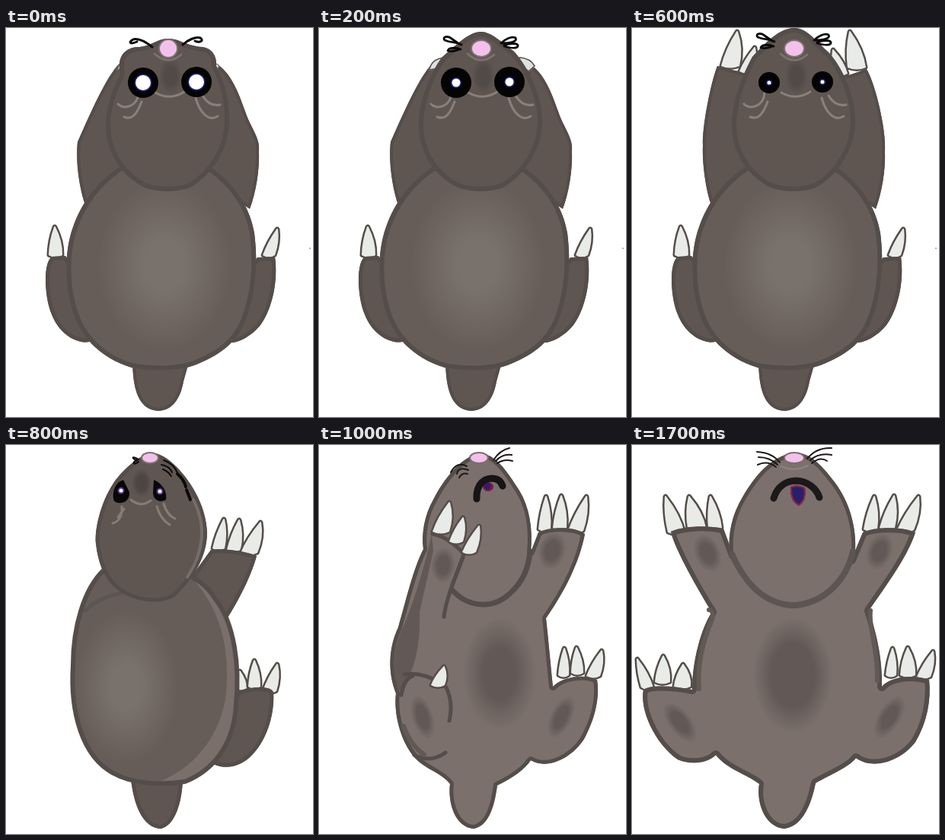
Write an HTML page with a canvas that moves like this. It is 403 px wide and 512 px high and loops after 2100 ms.

```html
<!DOCTYPE html>
<html lang="en">
<head>
<meta charset="utf-8">
<title>Rolling mole</title>
<style>
html, body { margin: 0; width: 100%; height: 100%; overflow: hidden; background: #fff; }
canvas { display: block; }
</style>
</head>
<body>
<canvas id="stage" width="403" height="512"></canvas>
<script>
const ctx = document.getElementById('stage').getContext('2d');
const EDGE = '#544d49', DARK = '#5f5652', BACK = '#675d58', BELLY = '#7b706b', PAD = '#625956', PINK = '#f3c0ec';

// Filled shape with its outline drawn inside the edge
function shape(d, fill, width = 5, edge = EDGE) {
  const path = new Path2D(d);
  ctx.save();
  ctx.fillStyle = fill;
  ctx.fill(path);
  ctx.clip(path);
  ctx.strokeStyle = edge;
  ctx.lineWidth = width * 2;
  if (width) ctx.stroke(path);
  ctx.restore();
}

function line(d, color = '#0b0909', width = 2) {
  ctx.strokeStyle = color;
  ctx.lineWidth = width;
  ctx.stroke(new Path2D(d));
}

function oval(x, y, rx, ry, fill, turn = 0) {
  ctx.fillStyle = fill;
  ctx.beginPath();
  ctx.ellipse(x, y, rx, ry, turn, 0, Math.PI * 2);
  ctx.fill();
}

// Soft-edged oval; core is the solid share of the radius
function glow(x, y, rx, ry, color, turn = 0, core = 0.5) {
  const g = ctx.createRadialGradient(0, 0, 0, 0, 0, 1);
  g.addColorStop(0, color);
  g.addColorStop(core, color);
  g.addColorStop(1, color + '00');
  ctx.save();
  ctx.translate(x, y);
  ctx.rotate(turn);
  ctx.scale(rx, ry);
  oval(0, 0, 1, 1, g);
  ctx.restore();
}

// Each claw: tip x, tip y, base x, base y, half width
function claws(...list) {
  for (const [tx, ty, x, y, w] of list) {
    const my = (ty + y) / 2, mx = (tx + x) / 2;
    const d = `M${x - w} ${y}Q${mx - w * .9} ${my} ${tx - 1} ${ty + 1}Q${tx} ${ty - 1} ${tx + 1} ${ty + 1}` +
      `Q${mx + w * 1.1} ${my} ${x + w} ${y}Q${x} ${y + 5} ${x - w} ${y}Z`;
    line(d, EDGE, 5);
    ctx.fillStyle = '#e8ebe8';
    ctx.fill(new Path2D(d));
  }
}

function eye(x, y, r, iris, ring = 1.5) {
  oval(x, y, r, r, '#050404');
  oval(x, y, iris + ring, iris + ring, '#20207a');
  oval(x, y, iris, iris, '#fff');
}

function nose(x, y, rx, ry) {
  oval(x, y, rx + 2, ry + 2, '#79706c');
  oval(x, y, rx, ry, PINK);
}

function sideFill(left, right) {
  const g = ctx.createLinearGradient(left, 0, right, 0);
  g.addColorStop(0, DARK);
  g.addColorStop(1, BELLY);
  return g;
}

const HEADS = [
  'M213 14C228 14 237 24 258 25C270 27 277 36 276 50C288 72 293 98 293 122C293 160 270 192 245 208C230 217 195 217 178 208C150 192 130 162 131 125C132 100 140 82 150 60C146 42 152 27 172 25C190 25 198 14 213 14Z',
  'M213 5C228 6 238 18 255 30C270 45 293 85 293 122C293 160 270 192 245 208C230 217 195 217 178 208C150 192 130 162 131 125C132 95 145 60 162 38C180 23 196 5 213 5Z',
  'M213 0C230 0 242 18 258 32C275 50 293 88 293 122C293 160 270 192 245 208C230 217 195 217 178 208C150 192 130 162 131 125C132 95 145 62 158 38C175 20 193 0 213 0Z'
];

function back(step) {
  shape('M166 440C167 470 171 502 200 504C222 503 230 482 233 465L240 440Z', DARK, 4);
  claws([64, 261, 65, 299, 9], [356, 264, 345, 299, 8]);
  shape('M60 301C49 310 51 345 56 365C62 388 75 406 95 412C105 415 112 413 116 410L120 350L78 300Z', DARK);
  shape('M330 302L353 301C357 330 351 367 334 391C322 406 305 414 296 414L290 350Z', DARK);

  if (step === 2) {
    claws([138, 4, 129, 50, 12], [286, 4, 295, 52, 12]);
    shape('M112 50C104 70 92 128 93 155C92 178 97 212 103 230L160 200L165 62L135 56Z', DARK, 4);
    shape('M308 54C320 75 334 135 332 162C333 187 328 217 320 238L260 200L262 64L285 62Z', DARK, 4);
    claws([161, 25, 150, 57, 9], [264, 28, 274, 60, 9]);
  } else {
    shape('M152 44C135 58 115 102 94 150C91 178 97 212 103 230L160 200L165 62Z', DARK, 4);
    shape('M275 46C292 57 302 75 314 110C322 133 334 145 332 162C333 187 328 217 320 238L260 200Z', DARK, 4);
    if (step) {
      shape('M144 56Q146 42 160 39L172 38L155 54Z', '#dfe1df', 1.5);
      shape('M263 38Q278 39 284 50L275 58L260 45Z', '#dfe1df', 1.5);
    } else {
      shape('M145 56L151 42L158 50Z', '#e8ebe8', 1);
      shape('M273 45L280 49L278 57Z', '#e8ebe8', 1);
    }
  }

  shape('M150 182C120 202 100 228 88 262C76 295 77 340 88 374C97 404 122 434 165 447C190 452 225 452 247 444C278 432 302 416 314 386C328 350 331 310 326 270C320 235 300 205 270 184Z', BACK, 6);
  glow(208, 312, 88, 112, '#79716b', 0, .3);
  shape(HEADS[step], DARK, 6);
  glow(216, 63, 15, 24, '#524a47');

  line('M196 85Q215 96 234 84M147 100C154 108 173 104 174 85M155 117C167 122 173 110 178 97M249 92C254 111 266 124 278 116M258 89Q267 104 281 101', '#89807c', 3);
  line('M195 34Q213 50 230 35', '#7b726e', 3);
  const [r, iris] = [[20, 10], [20, 5.5], [14, 2.5]][step];
  eye(180, 72, r, iris);
  eye(250, 71, r, iris);
  if (step) nose(213, 27, 12, 10);
  else nose(213, 27, 11, 11);

  if (step) {
    const y = step === 2 ? -4 : 0;
    ctx.save();
    ctx.translate(0, y);
    line('M187 22C180 18 174 20 165 16C161 11 170 10 174 14L184 21M186 28C178 25 170 26 169 30C178 32 181 29 185 28M239 20C244 15 253 10 258 13C261 18 251 20 240 20M243 23C250 20 262 19 261 24C259 28 250 26 243 24', '#0b0909', 2.8);
    ctx.restore();
  } else {
    line('M192 25C183 18 174 13 167 15C160 19 163 22 172 18M232 22C238 16 249 11 255 13C261 17 253 20 248 17', '#0b0909', 3);
  }
  oval(399, 290, 1, 1, '#999');
}

function turning() {
  shape('M164 440C168 475 180 504 203 505C222 501 231 470 232 440Z', DARK);
  claws([307, 297, 309, 320, 7], [326, 283, 326, 318, 8], [356, 288, 346, 324, 9]);
  shape('M305 324C325 317 350 317 351 326C353 356 341 392 320 411C305 425 285 427 270 419L285 360Z', DARK);
  claws([286, 97, 279, 136, 8], [306, 98, 299, 138, 9], [334, 101, 319, 142, 11]);
  shape('M269 138C285 135 320 141 329 146C322 172 305 205 291 227L235 185Z', DARK);

  const body = 'M128 165C102 190 88 240 86 290C82 352 98 412 140 434C165 448 205 450 235 445C272 430 301 397 304 342C309 290 302 235 276 202C266 187 256 180 240 172Z';
  shape(body, BACK, 0);
  ctx.save();
  ctx.clip(new Path2D(body));
  shape('M245 176C280 215 296 265 288 335C277 390 245 425 200 444L240 455L320 380L310 220Z', '#7a6f6a', 0);
  ctx.restore();
  glow(158, 318, 68, 100, '#79716b', 0, .3);
  line('M104 218Q123 200 151 195', '#5d5551', 5);
  line('M128 165C102 190 88 240 88 290C84 352 100 410 141 432C165 446 205 448 235 443C270 429 299 397 302 342C307 290 300 235 275 203C266 188 256 180 246 175', EDGE, 6);

  shape('M188 11C170 17 151 35 140 52C125 75 116 110 118 130C121 155 128 172 140 185C162 207 200 212 221 200C242 180 264 150 264 115C263 85 247 52 223 28C212 17 200 9 188 11Z', DARK, 5);
  line('M246 72C263 105 260 140 238 174', '#776d68', 4);
  glow(178, 50, 13, 19, '#4d4542');
  line('M164 72Q177 83 190 73M140 103C149 101 153 92 152 81M147 95L155 84M198 81Q203 98 215 105M207 77Q211 92 222 97', '#857c78', 3);
  shape('M154 46C143 49 138 64 142 74C151 80 163 74 162 62Z', '#080607', 0);
  shape('M194 46C203 49 212 60 210 72C201 77 193 72 193 62Z', '#080607', 0);
  for (const [x, y] of [[151, 60], [202, 61]]) {
    oval(x, y, 4.5, 4.5, '#55318c');
    oval(x, y, 2.5, 2.5, '#fff');
  }
  nose(189, 17, 10, 6);
  line('M174 19C165 13 164 18 172 20C164 23 168 27 174 22M204 26Q215 28 218 36M207 20Q221 25 225 37M206 32Q213 35 217 41', '#0b0909', 2);
  line('M225 38Q234 46 236 55M237 59L242 72', '#0b0909', 4);
}

function side() {
  claws([290, 66, 288, 111, 8], [308, 65, 305, 111, 9], [332, 67, 321, 112, 10],
    [309, 267, 308, 303, 6], [323, 265, 324, 301, 8], [351, 269, 343, 304, 8]);
  shape('M209 10C190 14 171 45 158 70C144 95 150 122 141 145C126 165 126 190 128 215C110 240 104 272 103 310C103 352 112 388 130 412C145 427 165 435 174 446C172 470 180 503 203 506C222 502 229 475 231 449C250 437 260 428 270 416C290 427 316 416 331 391C344 370 349 340 346 314C338 305 310 305 298 318C298 290 290 250 284 228C301 205 326 160 331 117C320 107 290 106 278 113L270 138C270 110 264 82 253 62C241 38 227 12 209 10Z', sideFill(176, 226), 5);
  line('M265 140C260 175 243 200 215 206', '#70655f', 4);
  line('M128 180Q123 200 131 220', '#5a514d', 7);

  claws([210, 65, 203, 106, 8], [231, 67, 220, 103, 8], [255, 68, 238, 108, 10]);
  shape('M194 110C207 99 237 106 245 116C236 148 211 180 190 205L174 150Z', '#796e69', 0);
  line('M193 109C185 137 163 169 144 188M245 116C235 148 207 184 185 213', EDGE, 5);
  line('M194 110Q218 101 245 115', EDGE, 3);
  glow(206, 135, 15, 22, PAD, .45);
  glow(296, 139, 17, 23, PAD, .3);

  claws([201, 267, 200, 299, 6], [214, 265, 215, 295, 7], [239, 269, 234, 299, 8]);
  shape('M195 303C174 312 161 345 162 400L183 412C215 405 238 350 237 305Q218 298 195 303Z', '#776c67', 0);
  line('M124 375C135 397 160 409 182 414C215 405 239 350 236 305', EDGE, 6);
  line('M192 304Q212 297 237 305', EDGE, 3);
  glow(196, 354, 14, 28, PAD, .4);
  glow(305, 358, 14, 30, PAD, .4);

  oval(187, 43, 10, 8, '#080607', -.7);
  oval(188, 43, 4, 4, '#3636a2');
  oval(188, 43, 2, 2, '#fff');
  shape('M227 32Q238 43 243 62L224 58Q222 43 227 32Z', '#161112', 0);
  line('M224 48Q231 40 238 48Q231 53 224 48', '#8d1c51', 2);
  oval(231, 48, 4, 2.5, '#36206d');
  nose(209, 15, 12, 5);
  line('M182 51Q163 51 156 62M177 55Q169 56 164 60', '#77706d', 1.8);
  line('M205 30Q201 42 210 50M210 29Q207 41 215 48M214 29Q211 38 218 44', '#0b0909', 2);
}

function opening() {
  claws([298, 67, 296, 111, 8], [318, 66, 316, 109, 9], [351, 67, 337, 113, 10],
    [322, 267, 321, 303, 7], [338, 266, 339, 300, 8], [371, 270, 360, 304, 9],
    [119, 267, 119, 302, 7], [149, 272, 139, 302, 8]);
  shape('M210 11C185 17 164 45 150 72C139 91 134 116 137 137C124 162 114 205 104 240C91 267 90 300 101 327C98 352 106 389 126 412C140 427 160 431 172 446C169 470 178 503 203 505C225 501 231 470 234 448C255 438 270 427 278 415C300 428 332 412 348 387C361 363 369 335 365 309C350 301 320 304 307 318C304 290 301 255 298 228C321 195 342 155 349 117C335 106 300 108 288 115L278 141C281 110 276 81 263 60C246 33 231 11 210 11Z', BELLY, 5);
  shape('M148 117C139 160 122 215 108 245C95 275 97 304 105 325L119 303Q134 268 132 220L150 140Z', PAD, 0);
  line('M174 190C197 216 230 215 250 196C268 180 275 162 277 140', EDGE, 7);
  line('M190 144C184 165 168 195 164 226', EDGE, 5);
  line('M190 143L174 185', EDGE, 4);
  line('M149 117Q170 121 190 143M112 302Q140 298 167 319C173 332 175 346 171 363M108 329Q112 307 123 304M125 408Q146 419 166 405', EDGE, 5);
  line('M111 370Q119 394 138 408', '#625955', 6);
  claws([171, 75, 160, 114, 11], [189, 95, 180, 127, 9], [210, 106, 197, 141, 9], [164, 291, 156, 316, 9]);

  glow(163, 158, 16, 24, PAD, .1);
  glow(306, 139, 18, 25, PAD, .25);
  glow(136, 358, 14, 30, PAD, -.3);
  glow(318, 358, 14, 30, PAD, .45);
  glow(237, 301, 48, 74, PAD, 0, .45);
  nose(210, 17, 11, 6);
  oval(222, 55, 7, 6, '#7b174d');
  oval(221, 54, 4.5, 4.5, '#351b69');
  line('M207 71C206 50 218 44 227 44C235 44 239 48 241 54', '#161415', 9);
  line('M229 20Q237 7 250 4M232 21Q241 11 253 13M234 24Q243 18 254 21M194 28Q181 21 173 36M196 33Q183 28 181 38M195 38Q188 36 184 43', '#1c1918', 2);
}

function front() {
  claws([44, 67, 58, 115, 11], [75, 67, 85, 109, 12], [103, 67, 109, 109, 9],
    [318, 67, 313, 111, 9], [344, 66, 335, 109, 10], [376, 67, 359, 112, 11],
    [7, 281, 20, 319, 8], [41, 277, 40, 312, 10], [67, 288, 66, 318, 11],
    [342, 267, 340, 303, 7], [362, 266, 362, 303, 10], [395, 271, 383, 305, 9]);
  shape('M51 114C55 135 89 195 105 220C91 240 79 285 79 322C55 317 25 315 15 322C10 348 29 392 60 414C80 422 100 418 110 408C125 427 150 433 167 446C163 470 174 503 200 505C225 502 236 470 241 445C262 433 285 424 294 412C316 428 352 417 372 391C387 366 393 335 390 309C370 302 340 304 328 318C329 280 320 245 311 218C326 195 361 150 372 115C350 106 315 109 303 115L288 151L133 145L120 110C100 106 70 106 51 114Z', BELLY, 6);
  line('M101 217Q108 217 105 230C94 256 85 286 88 321M313 218C310 240 323 265 322 310', '#625955', 6);
  shape('M213 10C181 15 161 42 146 67C131 92 126 116 128 142C142 178 169 213 213 215C251 211 283 180 293 140C295 110 286 75 266 49C250 28 235 10 213 10Z', BELLY, 5);
  line('M131 143C147 180 173 210 213 211C252 208 281 179 290 140', '#5c5551', 8);

  glow(99, 142, 17, 26, PAD, -.4);
  glow(325, 140, 17, 25, PAD, .35);
  glow(63, 365, 15, 31, PAD, -.65);
  glow(338, 358, 15, 32, PAD, .55);
  glow(211, 303, 52, 76, PAD, 0, .55);
  line('M196 28Q213 36 231 27', '#8b837f', 2);
  nose(213, 17, 12, 6);
  line('M186 70C191 54 203 47 216 47C231 48 242 57 246 69', '#1b191a', 9);
  shape('M208 55Q217 51 227 56Q230 73 219 80Q207 74 208 55Z', '#29206a', 1.8, '#951f43');
  line('M164 9Q184 10 194 23M166 16Q181 16 191 26M165 26Q178 20 189 29M230 18Q242 3 262 4M234 20Q245 10 262 13M236 24Q247 15 256 21', '#1c1918', 2);
}

const poses = [
  [1100, front], [1000, opening], [900, side], [800, turning],
  [300, () => back(2)], [200, () => back(1)], [0, () => back(0)]
];
const start = performance.now();

function draw() {
  const t = (performance.now() - start) % 2100;
  ctx.fillStyle = '#fff';
  ctx.fillRect(0, 0, 403, 512);
  ctx.lineCap = ctx.lineJoin = 'round';
  poses.find(([from]) => t >= from)[1]();
  requestAnimationFrame(draw);
}
draw();
</script>
</body>
</html>
```
